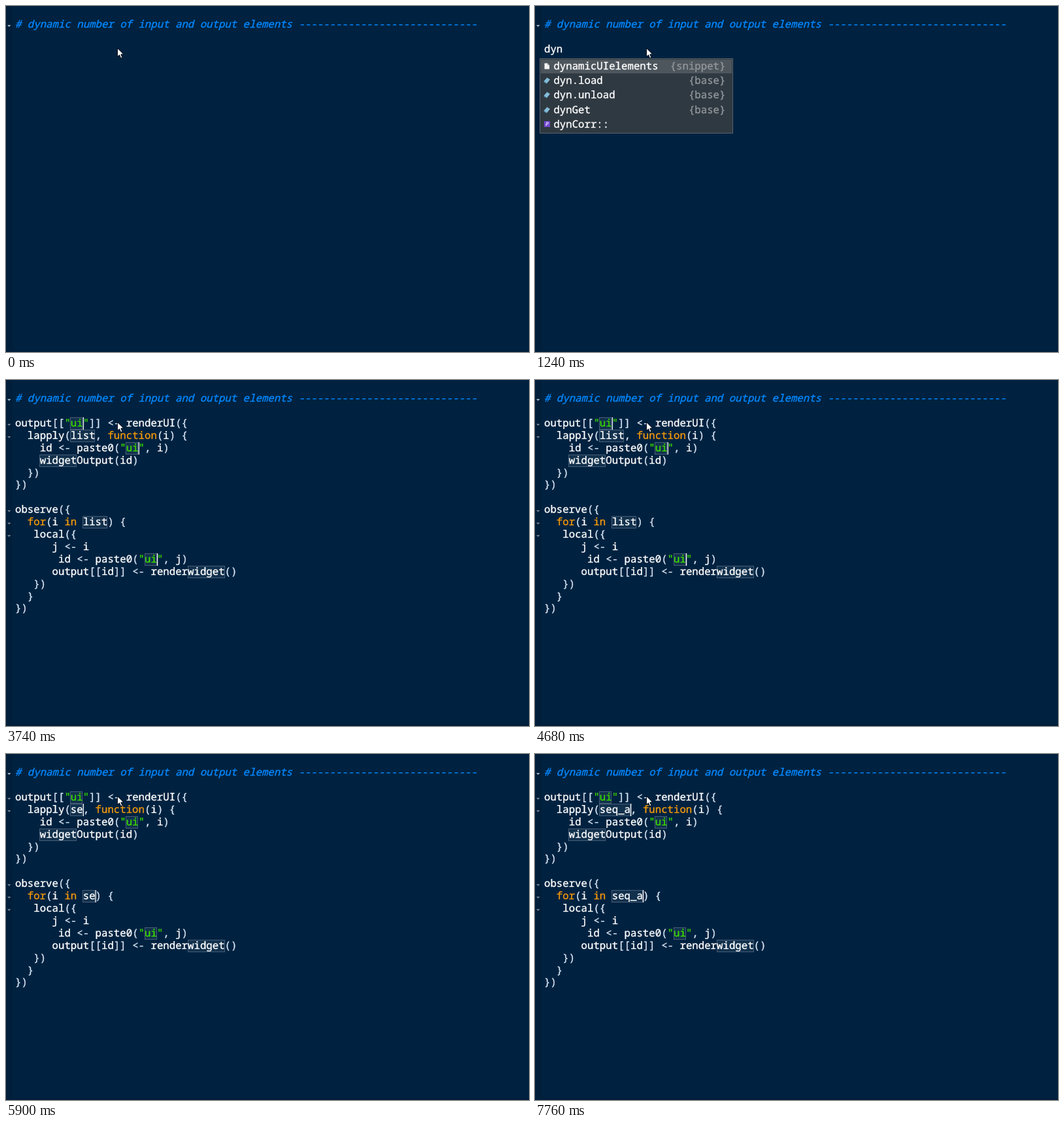
Write an HTML page with a canvas that moves like this. It is 800 px wide and 529 px high and loops after 8 s.

```html
<!DOCTYPE html>
<html lang="en">
<head>
<meta charset="utf-8">
<title>Snippet expansion</title>
<style>
  html, body { margin: 0; width: 100%; height: 100%; overflow: hidden; background: #002240; }
  canvas { display: block; }
</style>
</head>
<body>
<canvas id="stage" width="800" height="529"></canvas>
<script>
const ctx = document.getElementById('stage').getContext('2d');
const LOOP = 8000;
const LEFT = 14, TOP = 19.2, CHAR = 9.43, LINE = 18.9;
const FONT = `${CHAR / 0.6}px "Noto Sans Mono", "DejaVu Sans Mono", monospace`;
const COLOR = {
  plain: '#ffffff', punct: '#d8e6f5', keyword: '#f59a0a',
  string: '#3ad900', comment: '#0088ff'
};

// @u, @l and @w are the editable snippet fields.
const SNIPPET = [
  'output[["@u"]] <- renderUI({',
  '  lapply(@l, function(i) {',
  '    id <- paste0("@u", i)',
  '    @wOutput(id)',
  '  })',
  '})',
  '',
  'observe({',
  '  for(i in @l) {',
  '   local({',
  '      j <- i',
  '       id <- paste0("@u", j)',
  '      output[[id]] <- render@w()',
  '   })',
  '  }',
  '})'
];
const FOLDS = [2, 3, 9, 10, 11];

const POPUP = [
  ['dynamicUIelements', '{snippet}', 'file'],
  ['dyn.load', '{base}', 'func'],
  ['dyn.unload', '{base}', 'func'],
  ['dynGet', '{base}', 'func'],
  ['dynCorr::', '', 'pkg']
];

const fields = (u, l, active, caret, selected = false) =>
  ({ values: { u, l, w: 'widget' }, active, caret, selected });

const STEPS = [
  [0, { typed: '' }],
  [320, { typed: 'dy', caret: true }],
  [920, { typed: 'dyn', caret: true, popup: true }],
  [1240, { typed: 'dyn', popup: true }],
  [1870, fields('UIname', 'list', 'u', true, true)],
  [3740, fields('ui', 'list', 'u', true)],
  [4050, fields('ui', 'list', 'u', false)],
  [4680, fields('ui', 'list', 'u', true)],
  [4970, fields('ui', 'list', 'l', true, true)],
  [5590, fields('ui', 'list', 'l', false, true)],
  [5900, fields('ui', 'se', 'l', true)],
  [6530, fields('ui', 'seq', 'l', true)],
  [6850, fields('ui', 'seq_', 'l', true)],
  [7460, fields('ui', 'seq_', 'l', false)],
  [7760, fields('ui', 'seq_a', 'l', true)]
];

const colX = col => LEFT + col * CHAR;
const rowY = row => Math.round(TOP + row * LINE);

function rect(x, y, w, h, color) {
  ctx.fillStyle = color;
  ctx.fillRect(x, y, w, h);
}

function shape(points, fill, stroke) {
  ctx.beginPath();
  points.forEach(([x, y]) => ctx.lineTo(x, y));
  ctx.closePath();
  if (fill) { ctx.fillStyle = fill; ctx.fill(); }
  if (stroke) { ctx.strokeStyle = stroke; ctx.lineWidth = 1; ctx.stroke(); }
}

// A hairline outline gives the letters a slightly heavier stem.
function text(str, x, y, color) {
  ctx.fillStyle = ctx.strokeStyle = color;
  ctx.lineWidth = 0.35;
  ctx.fillText(str, x, y);
  ctx.strokeText(str, x, y);
}

function code(str, col, row, color) {
  text(str, colX(col), rowY(row) + 14, color);
}

function caretAt(col, row) {
  rect(colX(col), rowY(row), 1.3, 19, '#ffffff');
}

function fold(row, color) {
  const y = rowY(row) + 10;
  shape([[2, y], [7.5, y], [4.75, y + 3]], color);
}

function colorOf(token) {
  if (/^(function|for|in)$/.test(token)) return COLOR.keyword;
  if (token === '"') return COLOR.string;
  return /\w/.test(token) ? COLOR.plain : COLOR.punct;
}

function drawField(key, col, row, state) {
  const value = state.values[key], active = key === state.active;
  const x = Math.floor(colX(col)), y = rowY(row);
  const w = Math.ceil(value.length * CHAR);
  if (active && state.selected) rect(x, y, w, 19, 'rgba(179,101,57,.8)');
  rect(x, y, w, 19, 'rgba(194,193,208,.09)');
  ctx.setLineDash([1, 1]);
  ctx.lineWidth = 1;
  ctx.strokeStyle = 'rgba(211,208,235,.55)';
  ctx.strokeRect(x + 0.5, y + 0.5, w - 1, 18);
  ctx.setLineDash([]);
  code(value, col, row, key === 'u' ? COLOR.string : COLOR.plain);
  if (active && state.caret) caretAt(col + value.length, row);
}

function drawLine(line, row, state) {
  let col = 0;
  for (const token of line.match(/@[ulw]|\s+|"|\w+|[^\w\s"@]+/g) || []) {
    if (token[0] === '@') {
      drawField(token[1], col, row, state);
      col += state.values[token[1]].length;
    } else {
      code(token, col, row, colorOf(token));
      col += token.length;
    }
  }
}

function drawIcon(kind, y) {
  if (kind === 'file') {
    shape([[14.5, y - 4.5], [19, y - 4.5], [22, y - 1.5], [22, y + 4.5], [14.5, y + 4.5]], '#f2f2f2');
    shape([[19, y - 4.5], [22, y - 1.5], [19, y - 1.5]], '#a9adb0');
  } else if (kind === 'func') {
    shape([[13.5, y + 1], [18.5, y - 4.5], [23, y - 1.5], [18, y + 4.5]], '#83bcd8');
    shape([[13.5, y + 1], [18, y + 4], [18, y + 5], [13.5, y + 2.5]], '#4d8bab');
  } else {
    rect(14, y - 5, 9, 9, '#7047cf');
    shape([[17, y + 2], [17.5, y - 3], [20.5, y - 3], [20, y - 0.5], [17.5, y - 0.5]], null, '#e0d6fa');
  }
}

function drawPopup() {
  rect(7, 80, 296, 115, '#59636b');
  rect(8, 81, 294, 113, '#2f3941');
  rect(9, 82, 292, 21, '#4e565d');
  POPUP.forEach(([name, origin, kind], i) => {
    const y = Math.round(91.5 + i * 22.4);
    drawIcon(kind, y);
    text(name, 28.4, y + 5, '#ffffff');
    text(origin, 291.5 - origin.length * CHAR, y + 5, '#92979b');
  });
}

function drawPointer() {
  const outline = [[0, 0], [0, 13], [3, 10.3], [5.2, 15.3], [7.4, 14.3], [5.3, 9.5], [9.3, 9.2]];
  shape(outline.map(([x, y]) => [x + 170.5, y + 64.5]), '#ffffff', '#000c18');
}

function render(time) {
  const state = STEPS.filter(([start]) => start <= time).pop()[1];
  rect(0, 0, 800, 529, '#002240');
  rect(0, 0, 10, 529, '#011e3a');
  rect(0, 526, 800, 3, '#011e3a');

  ctx.textRendering = 'geometricPrecision';
  ctx.lineJoin = 'round';
  ctx.font = 'italic ' + FONT;
  code('# dynamic number of input and output elements ' + '-'.repeat(29), 0, 0, COLOR.comment);
  ctx.font = FONT;
  ctx.lineJoin = 'miter';
  fold(0, '#a3b9c6');

  if (state.values) {
    FOLDS.forEach(row => fold(row, '#71818f'));
    SNIPPET.forEach((line, i) => drawLine(line, i + 2, state));
  } else {
    code(state.typed, 0, 2, COLOR.plain);
    if (state.caret) caretAt(state.typed.length, 2);
    if (state.popup) drawPopup();
  }
  drawPointer();
}

const origin = performance.now();
function tick() {
  render((performance.now() - origin) % LOOP);
  requestAnimationFrame(tick);
}
tick();
</script>
</body>
</html>
```
